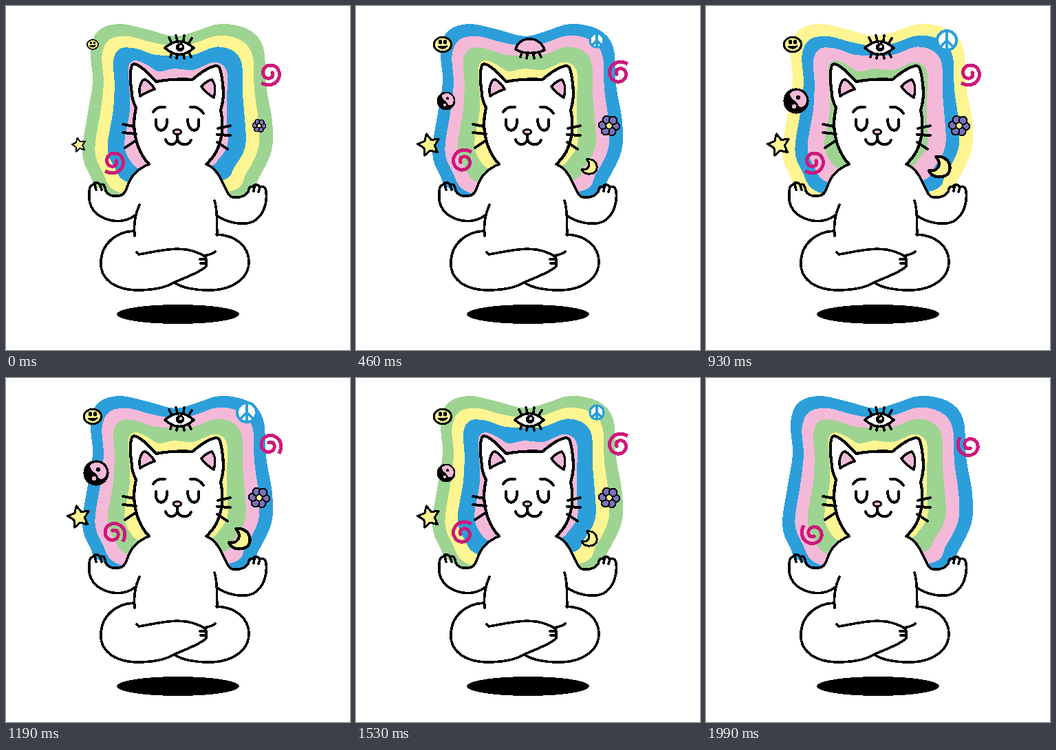
Write an HTML page that moves like this. It is 500 by 500 pixels and loops after 2020 ms.

```html
<!DOCTYPE html>
<html lang="en">
<head>
<meta charset="utf-8">
<title>Meditating cat</title>
<style>
html, body { margin: 0; width: 100%; height: 100%; overflow: hidden; background: #fff; }
svg { display: block; width: 100%; height: 100%; shape-rendering: crispEdges; }
.ink { fill: none; stroke: #000; stroke-width: 3.6; stroke-linecap: round; stroke-linejoin: round; }
.skin { fill: #fff; }
.charm { stroke-width: 4.2; }
</style>
</head>
<body>
<svg viewBox="0 0 500 500">
  <g id="bands"></g>
  <g class="ink">
    <path class="skin" stroke="none" d="M208 230C190 237 182 248 178 258C174 269 172 276 162 276C154 277 148 274 145 269L126 260L121 272C119 290 128 305 150 311C165 315 180 311 189 303L186 327L190 400H300L306 304C320 315 345 320 360 313C375 304 380 285 378 270L359 263L352 270C347 277 338 279 330 278C322 277 320 265 314 255C308 242 300 233 291 230Z"/>
    <path d="M208 230C190 237 182 248 178 258C174 269 172 276 162 276C154 277 148 274 145 269C144 260 140 257 137 261C135 256 129 255 126 260C121 262 121 267 121 272C119 290 128 305 150 311C165 315 180 311 189 303M194 289C189 300 185 316 187 334M303 283C308 297 306 315 307 333M306 304C320 315 345 320 360 313C375 304 380 285 378 270C377 262 372 261 369 264C366 258 361 259 359 263C354 261 353 265 352 270C347 277 338 279 330 278C322 277 320 265 314 255C308 242 300 233 291 230M129 260L131 267M137 261L139 267M361 263L360 269M369 264L367 270"/>
    <path d="M186 327C160 328 140 345 138 370C136 395 155 412 190 413C222 413 235 407 244 402C256 396 282 388 291 378V368C291 362 285 362 277 358C250 347 215 358 193 361L190 358M304 357C300 361 294 362 287 363M282 368H291M283 374H291M244 402C255 409 275 414 300 413C330 412 354 395 353 370C352 350 335 333 306 332"/>
    <path class="skin" stroke-width="4.2" d="M208 230C193 214 187 195 186 172Q186 160 189 148Q183 136 183 127C180 108 180 90 184 85C190 81 207 97 218 110Q245 105 271 107C286 94 303 84 309 88C313 93 316 115 316 130Q315 142 312 151C316 170 316 190 306 211Q300 222 291 230"/>
    <path fill="#f4b9d8" d="M195 131C192 118 197 106 203 107Q212 113 216 121Q204 125 195 131ZM284 117Q291 109 299 107C304 112 305 122 302 133Q291 127 284 117Z"/>
    <path stroke-width="4" d="M214 154Q220 145 231 147M268 147Q279 145 287 156M218 165C215 185 235 187 234 165M264 165C264 186 284 186 280 165M249 187V194M232 194C235 204 247 203 249 194C253 204 266 203 269 195M170 172L186 175M170 184L189 186M173 206L188 196M308 178L326 174M307 187L326 188M307 198L322 208"/>
    <ellipse cx="249" cy="183" rx="6" ry="3.6" fill="#f4b9d8" stroke-width="3"/>
  </g>
  <ellipse cx="250" cy="448" rx="89" ry="14"/>
  <g id="charms"></g>
</svg>
<script>
const GREEN = '#9ed492', YELLOW = '#fdf591', BLUE = '#2c9fdb', PINK = '#f4b9d8';
const MAGENTA = '#cc1a7b', PURPLE = '#7a72b9';
const palette = [GREEN, YELLOW, BLUE, PINK];
const $ = id => document.getElementById(id);
const list = (n, f) => Array.from({length: n}, (_, i) => f(i));
const polar = (r, a) => [r * Math.cos(a), r * Math.sin(a)].map(v => +v.toFixed(1));
const points = text => text.split(' ').map(s => s.split(',').map(Number));

// closed smooth curve through points
function smooth(p) {
  const n = p.length;
  const curves = p.map((a, i) => {
    const z = p[(i + n - 1) % n], b = p[(i + 1) % n], c = p[(i + 2) % n];
    const c1 = a.map((v, k) => v + (b[k] - z[k]) / 6);
    const c2 = b.map((v, k) => v - (c[k] - a[k]) / 6);
    return `C${c1} ${c2} ${b}`;
  });
  return 'M' + p[0] + curves.join('') + 'Z';
}

// the aura blends from its outer edge to its inner edge
const outer = points('150,285 122,246 111,212 119,155 126,110 123,65 134,36 165,26 205,34 245,44 275,37 312,26 352,34 374,60 378,115 387,168 386,210 367,251 345,283 250,290');
const inner = points('197,238 180,224 172,200 180,152 179,115 178,88 188,79 206,86 222,95 245,91 272,93 300,82 315,86 322,100 321,135 321,168 322,202 308,224 297,233 250,250');
const blend = w => outer.map((p, i) => p.map((v, k) => v + (inner[i][k] - v) * w));
$('bands').innerHTML = [0, .3, .6, 1].map(w => `<path d="${smooth(blend(w))}"/>`).join('');

const starPath = 'M' + list(10, i => polar(i % 2 ? 11.5 : 23, i * Math.PI / 5 - 1.8)).join('L') + 'Z';
const spiralPath = 'M' + list(40, i => polar(18 - i * .375, -.85 - i * .24)).join('L');
const petals = list(6, i => {
  const [x, y] = polar(13, i * Math.PI / 3 + .1);
  return `<circle cx="${x}" cy="${y}" r="8" fill="${PURPLE}" stroke-width="2.8"/>`;
}).join('');

const art = {
  smiley: `<ellipse rx="17.5" ry="15" fill="${YELLOW}"/><path d="M-9 4Q0 12 9 3Q0 6-9 4" fill="#000" stroke-width="3"/><path d="M-5-6V-4M5-6V-4" stroke-width="7"/>`,
  star: `<path d="${starPath}" fill="${YELLOW}"/>`,
  flower: petals + `<circle r="6.5" fill="${YELLOW}" stroke-width="2.8"/>`,
  yinYang: `<circle r="16.5" fill="#000"/><path d="M-9-11A14 14 0 0 1 13 6C9 11 3 9 2 4C0-2-8 0-9-11Z" fill="${PINK}" stroke="none"/><circle cx="3" cy="-5" r="3" fill="#000" stroke="none"/><circle cx="-3" cy="8" r="3" fill="${PINK}" stroke="none"/>`,
  peace: `<g stroke="${BLUE}"><circle r="14" fill="#fff"/><path d="M0-14V14M0 0L-10 10M0 0L10 10"/></g>`,
  moon: `<path d="M-5-14C16-17 22 8 8 14C-4 18-13 13-15 6C-4 9 6-2-5-14Z" fill="${YELLOW}"/>`
};

const scales = [0, .46, .72, 1];
const place = (name, x, y, size) => size &&
  `<g class="ink charm" transform="translate(${x} ${y}) scale(${scales[size]})">${art[name]}</g>`;

const spiral = (x, y, turn) =>
  `<path d="${spiralPath}" fill="none" stroke="${MAGENTA}" stroke-width="5" transform="translate(${x} ${y}) rotate(${-90 * turn})"/>`;

// grow, pulse between two sizes, shrink; the leading group pulses in opposition
function charmSize(tick, lead) {
  const pulse = 2 + (Math.floor((tick + 1) / 6) % 2 === lead);
  const grow = Math.floor(tick / 6) + lead, shrink = Math.floor((60 - tick) / 4) - lead;
  return Math.max(0, Math.min(grow, pulse, shrink));
}

function eye(tick) {
  const lid = Math.max(0, Math.min(2, Math.round(3 - Math.abs(tick - 17) / 2.4)));
  const lashes = '<path d="M241 68L239 74M249 71L248 76M258 71L259 76M266 68L269 74"/>';
  const dome = `<path d="M232 63C237 43 267 42 274 64C262 70 243 70 232 63Z" fill="${PINK}"/>`;
  const half = '<path d="M234 63Q253 55 272 63Q253 73 234 63Z" fill="#fff"/><path d="M247 61Q253 69 259 61Z" fill="#000"/>';
  const open = '<path d="M231 61Q252 42 273 61Q252 80 231 61Z" fill="#fff"/><circle cx="253" cy="60" r="4.5" fill="#000"/><circle cx="254" cy="59" r="2" fill="#fff" stroke="none"/><path d="M240 52L237 46M249 50L247 43M258 50L259 43M266 54L270 47"/>';
  return `<g class="ink">${lashes}${[open, dome + half, dome][lid]}</g>`;
}

function draw(tick) {
  const shift = Math.floor((tick + 2) / 6);
  [...$('bands').children].forEach((band, i) => band.setAttribute('fill', palette[(shift + i) % 4]));

  const a = charmSize(tick, 1), b = charmSize(tick, 0);
  const turn = 2 + Math.min(7, Math.floor((tick + 4) / 8));
  $('charms').innerHTML = [
    place('smiley', 126, 56, a),
    place('star', 106, 202, a),
    place('flower', 368, 174, a),
    place('yinYang', 131, 138, b),
    place('peace', 350, 50, b),
    place('moon', 339, 233, b),
    spiral(156, 226, turn),
    spiral(383, 98, turn),
    eye(tick)
  ].filter(Boolean).join('');
}

const start = performance.now();
let last = -1;
function loop() {
  const t = (performance.now() - start) % 2020;
  const tick = Math.min(60, Math.floor((t + 6) / 33.2));
  if (tick !== last) draw(last = tick);
  requestAnimationFrame(loop);
}
loop();
</script>
</body>
</html>
```
